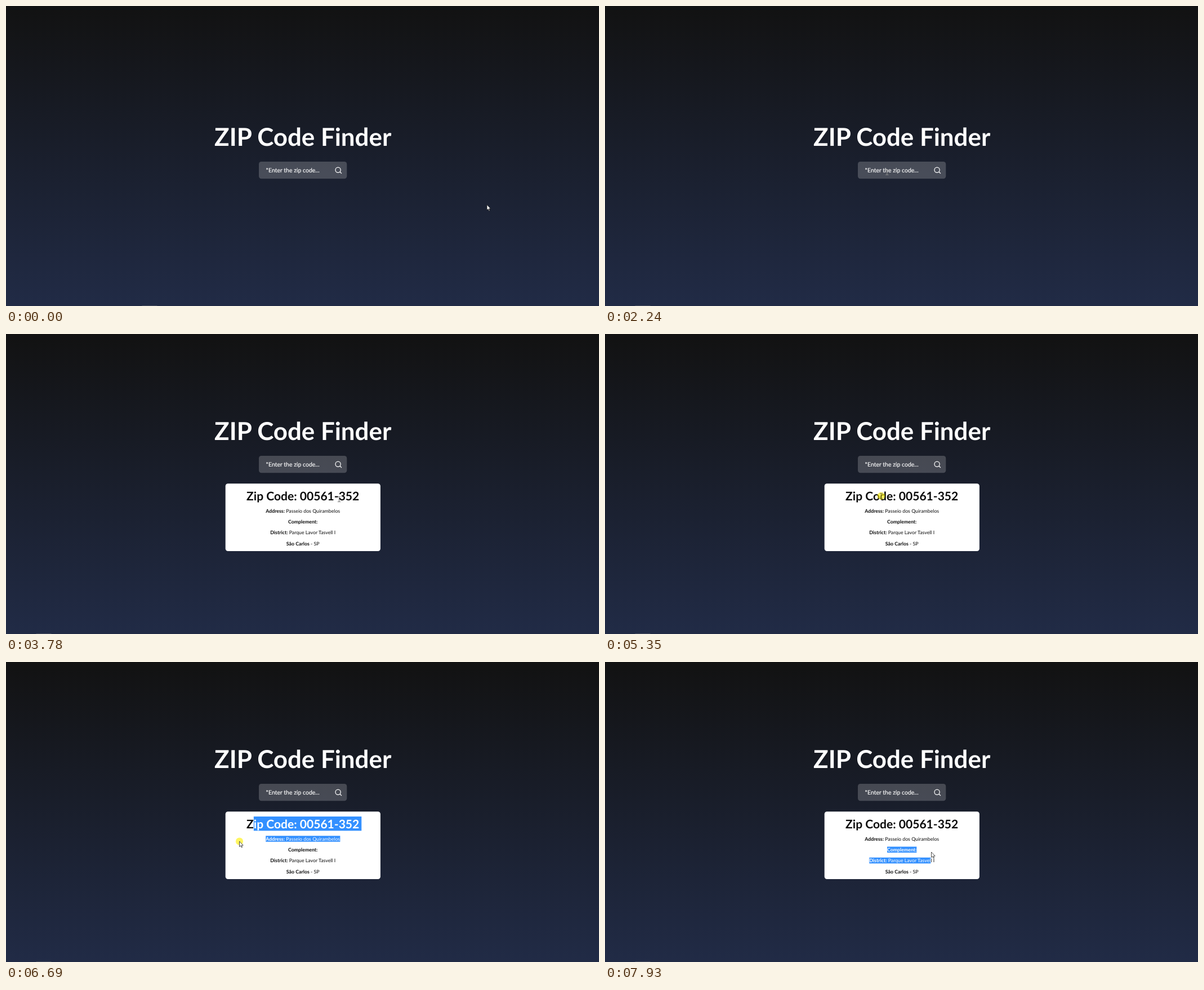
These frames come from a looping animation (1053 by 532 pixels, 8000 ms). An HTML page:

```html
<!DOCTYPE html>
<html lang="en">
<head>
<meta charset="utf-8">
<title>ZIP Code Finder</title>
<style>
  html, body { margin: 0; width: 100%; height: 100%; overflow: hidden; }
  body { background: linear-gradient(180deg, #121212, #212b46); }
  svg { display: block; width: 100%; height: 100%; }
  text { font-family: Lato, sans-serif; white-space: pre; text-rendering: geometricPrecision; }
  .title { font-size: 43.87px; font-weight: 700; fill: #fff; text-anchor: middle; }
  .field { font-size: 10.53px; fill: #fff; stroke: #fff; stroke-width: .15px; }
  .line { font-size: 8.77px; text-anchor: middle; }
  .heading { font-size: 21.06px; font-weight: 700; }
  .bold { font-weight: 700; }
</style>
</head>
<body>
<svg viewBox="0 0 1053 532">
  <rect id="status" y="531" width="27" height="1" fill="#454c5e"/>
  <g id="form">
    <text class="title" x="527.2" y="248.2">ZIP Code Finder</text>
    <rect x="449" y="276" width="156.3" height="30.2" rx="4.4" fill="#fff" fill-opacity=".2"/>
    <text id="query" class="field" x="461.5" y="295.2"></text>
    <g fill="none" stroke="#fff" stroke-width="1.25">
      <circle cx="589.6" cy="290.7" r="4.6"/>
      <path d="M592.9 294 L596 297.1"/>
    </g>
  </g>
  <g id="card">
    <rect x="389.7" y="265.2" width="275.2" height="119.8" rx="4.4" fill="#fff"/>
  </g>
  <circle id="press" r="6.6" fill="#fff000" fill-opacity=".62"/>
  <path id="arrow" d="M0 0 V9.6 L2.2 7.6 L3.7 10.9 L5.1 10.3 L3.7 7.1 H6.7 Z"
        fill="#fff" stroke="#151515" stroke-width=".75"/>
  <path id="beam" d="M-2.5 -4.6 H-.6 L0 -4.1 L.6 -4.6 H2.5 M0 -4.1 V4.1 M-2.5 4.6 H-.6 L0 4.1 L.6 4.6 H2.5"
        fill="none" stroke-width=".8"/>
</svg>
<script>
const NS = 'http://www.w3.org/2000/svg';
const LOOP = 8000, TYPED_AT = 2660, CARD_AT = 3780;
const $ = id => document.getElementById(id);

function add(parent, tag, attrs = {}, text = '') {
  const el = document.createElementNS(NS, tag);
  for (const key in attrs) el.setAttribute(key, attrs[key]);
  if (text) el.textContent = text;
  return parent.appendChild(el);
}

function set(el, attrs) {
  for (const key in attrs) el.setAttribute(key, attrs[key]);
}

// A card line: dark text plus a highlighted copy revealed by a clip.
function makeLine(id, top, size, bold, plain = '') {
  const card = $('card');
  const heading = size > 20;
  const drawText = (parent, fill) => {
    const el = add(parent, 'text', {
      class: heading ? 'line heading' : 'line', x: 527.2, y: top + size * .987, fill
    });
    add(el, 'tspan', { class: 'bold' }, bold);
    if (plain) add(el, 'tspan', {}, plain);
    return el;
  };
  const text = drawText(card, '#0b0b0b');
  const clip = add(add(card, 'clipPath', { id }), 'rect', {
    y: top, height: size * 1.2, width: 0
  });
  const marked = add(card, 'g', { 'clip-path': `url(#${id})` });
  add(marked, 'rect', { x: 390, y: top - 1, width: 275, height: size * 1.4, fill: '#3390ff' });
  drawText(marked, '#fff');
  return { text, clip, tail: heading ? 4 : 0 };
}

const heading = makeLine('m0', 274.1, 21.06, 'Zip Code: 00561-352');
const address = makeLine('m1', 308.3, 8.77, 'Address:', ' Passeio dos Quirambelos');
const complement = makeLine('m2', 327.5, 8.77, 'Complement:');
const district = makeLine('m3', 346.8, 8.77, 'District:', ' Parque Lavor Tasvell I');
const city = makeLine('m4', 366, 8.77, 'São Carlos', ' - SP');
const lines = [heading, address, complement, district, city];

// Nearest gap between characters to a given x.
function snap(line, x) {
  const { text } = line;
  const count = text.getNumberOfChars();
  let best = text.getEndPositionOfChar(count - 1).x;
  for (let i = 0; i < count; i++) {
    const edge = text.getStartPositionOfChar(i).x;
    if (Math.abs(edge - x) < Math.abs(best - x)) best = edge;
  }
  return best;
}

function mark(line, from, to = Infinity) {
  const box = line.text.getBBox();
  const a = snap(line, from);
  const b = to === Infinity ? box.x + box.width + line.tail : snap(line, to);
  set(line.clip, { x: Math.min(a, b), width: Math.abs(b - a) });
}

// Pointer moves: start, end, steps, bend x, y, goal x, y.
const moves = [
  [70, 70, 1, 851, 348, 849, 345],
  [610, 1120, 7, 560, 255, 496, 294.5],
  [2130, 2490, 5, 502, 296, 508.5, 292],
  [2930, 3190, 4, 550, 300, 583, 297],
  [3275, 3700, 6, 592, 302, 591.5, 293],
  [3870, 4050, 3, 640, 296, 693.5, 306],
  [4450, 5090, 9, 560, 375, 435, 293],
  [5260, 5680, 6, 509, 280, 637, 292],
  [5930, 6690, 10, 500, 292, 414.5, 318],
  [6770, 7190, 6, 450, 330, 497, 330],
  [7350, 7930, 8, 540, 329, 579.5, 337]
];

function pointerAt(t) {
  let x = 854, y = 352.5;
  for (const [start, end, steps, bendX, bendY, goalX, goalY] of moves) {
    if (t < start) break;
    const gap = (end - start) / (steps - 1 || 1);
    const step = t >= end ? steps : Math.floor((t - start) / gap + .02) + 1;
    const p = step / steps, q = 1 - p;
    x = q * q * x + 2 * p * q * bendX + p * p * goalX;
    y = q * q * y + 2 * p * q * bendY + p * p * goalY;
  }
  return { x, y };
}

const presses = [[2390, 2490], [3610, 3700], [5260, 6770], [7350, 7850]];

function isOverText(t, { x, y }) {
  if (t < CARD_AT) return x > 449 && x < 584 && y > 276 && y < 306;
  return lines.some(({ text }) => {
    const box = text.getBBox();
    return x > box.x && x < box.x + box.width && y > box.y && y < box.y + box.height;
  });
}

function select(t, { x, y }) {
  for (const line of lines) line.clip.setAttribute('width', 0);
  if (t >= 5430 && t < 7350) {
    const drag = t < 6690 ? { x, y } : { x: 414.5, y: 318 };
    if (drag.y < 304) {
      mark(heading, 439, drag.x > 630 ? Infinity : drag.x);
    } else {
      mark(heading, 439);
      mark(address, 0, drag.x < 461 ? Infinity : drag.x);
    }
  } else if (t >= 7350) {
    if (y < 335) {
      mark(complement, 0, x);
    } else {
      mark(complement, 0);
      mark(district, 0, x - 2);
    }
  }
}

function show(el, visible) {
  el.style.display = visible ? '' : 'none';
}

function render(t) {
  const found = t >= CARD_AT;
  const pointer = pointerAt(t);
  const place = `translate(${pointer.x} ${pointer.y})`;

  set($('status'), { x: t < 2210 ? 241.5 : 53.5 });
  set($('form'), { transform: `translate(0 ${found ? -60 : 0})` });
  $('query').textContent = t >= TYPED_AT && !found ? '00561352' : '*Enter the zip code...';
  show($('card'), found);
  if (found) select(t, pointer);

  const overText = isOverText(t, pointer);
  set($('arrow'), { transform: place });
  set($('beam'), { transform: place, stroke: found ? '#444' : '#a2a29f' });
  set($('press'), { transform: place });
  show($('arrow'), !overText);
  show($('beam'), overText);
  show($('press'), presses.some(([from, to]) => t >= from && t < to));
}

const begin = performance.now();
function tick() {
  render((performance.now() - begin) % LOOP);
  requestAnimationFrame(tick);
}
tick();
</script>
</body>
</html>
```
